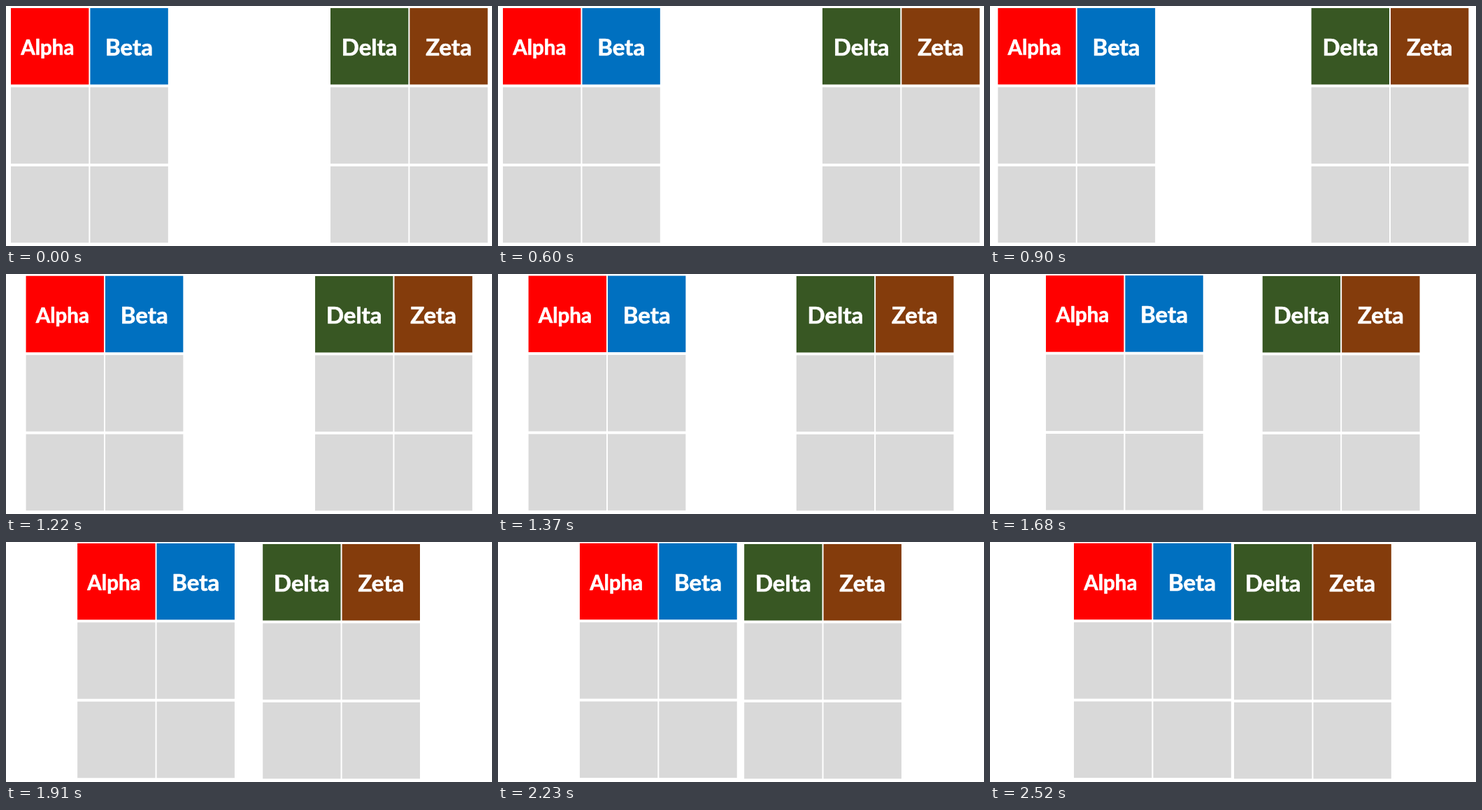
These frames come from a looping animation (695x344 px, 3.69 s). An HTML page with a canvas:

```html
<!DOCTYPE html>
<html lang="en">
<head>
<meta charset="utf-8">
<title>Tables joining</title>
<style>
  html, body { margin: 0; width: 100%; height: 100%; overflow: hidden; background: #fff; }
  canvas { display: block; }
</style>
</head>
<body>
<canvas id="stage" width="695" height="344"></canvas>
<script>
const ctx = document.getElementById('stage').getContext('2d');
const LOOP = 3690;
const START = 592, TICK = 76.8, STEPS = 26;
const CELL_W = 111.4, CELL_H = 109.5, PITCH = 113.4;
const GREY = '#d9d9d9';

const LEFT = [
  { name: 'Alpha', color: '#ff0000', size: 29.5, center: 52.3, base: 67 },
  { name: 'Beta', color: '#0070c0', size: 33, center: 55.7, base: 68 }
];
const RIGHT = [
  { name: 'Delta', color: '#385723', size: 33, center: 55.7, base: 68 },
  { name: 'Zeta', color: '#843c0c', size: 33, center: 55.7, base: 68 }
];

const clamp = (v, lo, hi) => Math.min(Math.max(v, lo), hi);

// Soft start and end with a nearly even speed between.
function ease(u) {
  const a = u ** 2.12, b = (1 - u) ** 2.12;
  return a / (a + b);
}

// The picture advances in even ticks, not continuously.
function progress(ms) {
  const step = clamp(Math.floor((ms - START) / TICK) + 1, 0, STEPS);
  return ease(clamp((step - 0.4) / (STEPS - 0.4), 0, 1));
}

function drawTable(columns, x, y) {
  columns.forEach((col, i) => {
    const left = x + i * PITCH;
    for (let row = 0; row < 3; row++) {
      ctx.fillStyle = row ? GREY : col.color;
      ctx.fillRect(left, y + row * PITCH, CELL_W, CELL_H);
    }
    ctx.font = `700 ${col.size}px Lato, Calibri, sans-serif`;
    ctx.fillStyle = '#fff';
    ctx.fillText(col.name, left + col.center, y + col.base);
    ctx.strokeText(col.name, left + col.center, y + col.base);
  });
}

function draw(ms) {
  const p = progress(ms);
  ctx.fillStyle = '#fff';
  ctx.fillRect(0, 0, 695, 344);
  ctx.textAlign = 'center';
  ctx.strokeStyle = '#fff';
  ctx.lineWidth = 0.7;
  ctx.lineJoin = 'round';
  drawTable(LEFT, 7 + 113 * p, 3 - 1.3 * p);
  drawTable(RIGHT, 464 - 115 * p, 3);
}

function loop() {
  draw(performance.now() % LOOP);
  requestAnimationFrame(loop);
}
loop();
</script>
</body>
</html>
```
